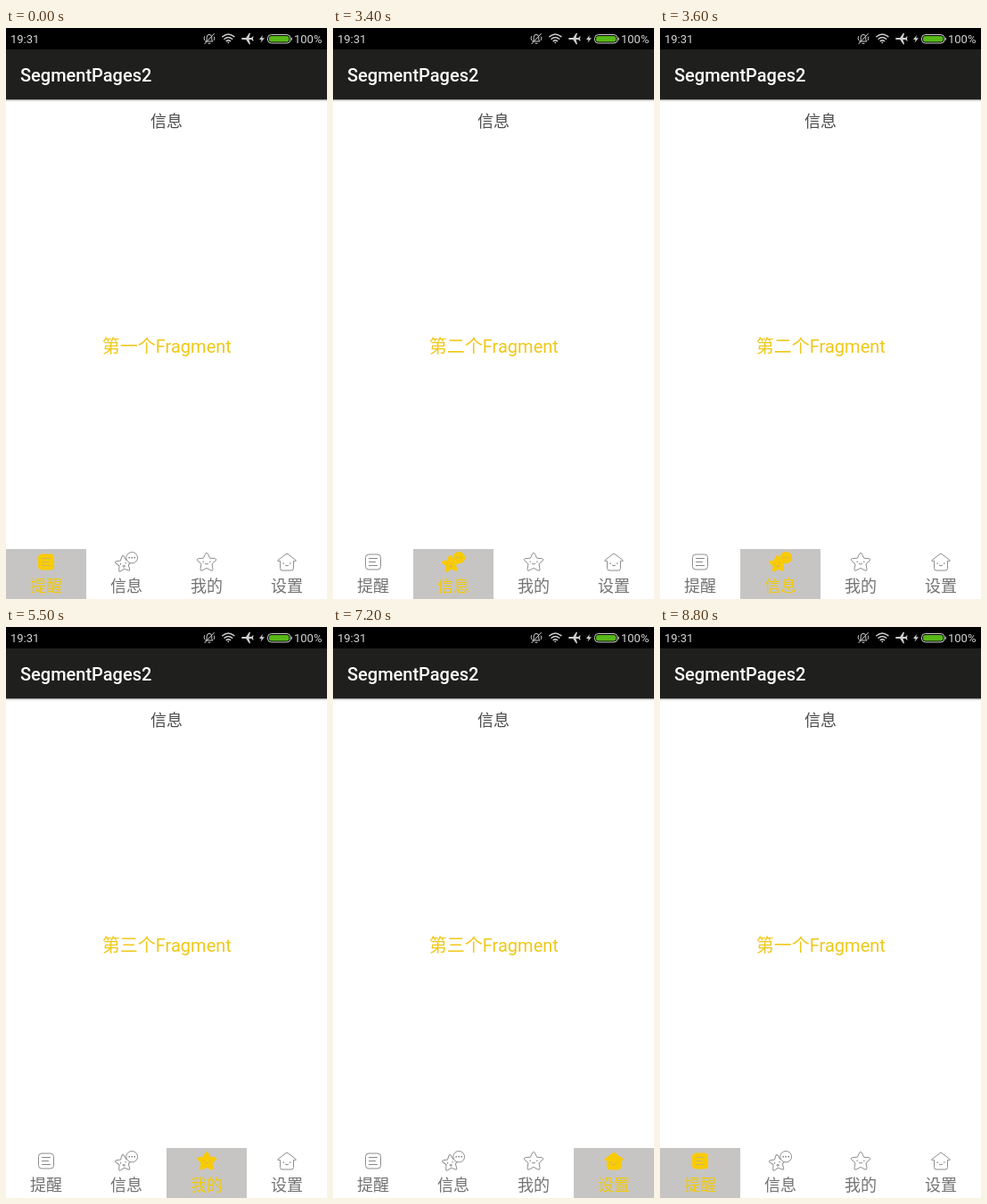
Write an HTML page that moves like this. It is 360 by 640 pixels and loops after 8.9 s.

```html
<!DOCTYPE html>
<html lang="zh-CN">
<head>
<meta charset="utf-8">
<title>Tabs</title>
<style>
html, body { margin: 0; width: 100%; height: 100%; overflow: hidden; background: #fff; }
svg { display: block; width: 360px; height: 640px; }
text { font-family: Roboto, "Noto Sans CJK SC", "Noto Sans CJK", sans-serif; }

.status { fill: #d6d6d6; font-size: 13px; }
.title { fill: #fff; font-size: 20px; font-weight: 500; }
.head { fill: #4c4c4c; font-size: 18px; font-weight: 300; text-anchor: middle; }
.body { fill: #efc81a; font-size: 20px; font-weight: 300; }
.latin { font-weight: 400; }
.label { fill: var(--label); font-size: 18px; font-weight: 300; text-anchor: middle; }
.glyph { fill: none; stroke: #d0d0d0; stroke-width: 1.2; stroke-linecap: round; }

.off { --ink: #8e8e8e; --fill: #fff; --face: #868686; --label: #737373; }
.on { --ink: #f9cb00; --fill: #f9cb00; --face: #cdb568; --label: #f0c90c; }
.shape { fill: var(--fill); stroke: var(--ink); stroke-linejoin: round; vector-effect: non-scaling-stroke; }
.line { fill: none; stroke: var(--face); stroke-linecap: round; }
.dot { fill: var(--face); }

.t1, .t2, .t3, .t4, .n3, .n4 { opacity: 0; animation: 8900ms step-end infinite; }
.t1 { animation-name: first; }
.t2 { animation-name: second; }
.t3 { animation-name: third; }
.t4 { animation-name: fourth; }
.n3 { animation-name: thirdText; }
.n4 { animation-name: fourthText; }
@keyframes first { 0% { opacity: 1 } 38.202% { opacity: 0 } 96.629%, 100% { opacity: 1 } }
@keyframes second { 0% { opacity: 0 } 38.202% { opacity: 1 } 59.551%, 100% { opacity: 0 } }
@keyframes third { 0% { opacity: 0 } 59.551% { opacity: 1 } 80.899%, 100% { opacity: 0 } }
@keyframes fourth { 0% { opacity: 0 } 80.899% { opacity: 1 } 96.629%, 100% { opacity: 0 } }
/* the page text follows the last tab slightly late */
@keyframes thirdText { 0% { opacity: 0 } 59.551% { opacity: 1 } 82.022%, 100% { opacity: 0 } }
@keyframes fourthText { 0% { opacity: 0 } 82.022% { opacity: 1 } 96.629%, 100% { opacity: 0 } }
</style>
</head>
<body>
<svg viewBox="0 0 360 640">
  <defs>
    <linearGradient id="shade" x2="0" y2="1">
      <stop offset="0" stop-color="#000" stop-opacity=".5"/>
      <stop offset=".45" stop-color="#000" stop-opacity=".12"/>
      <stop offset="1" stop-color="#000" stop-opacity="0"/>
    </linearGradient>
    <path id="star" class="shape" d="M-3.6 -4.6L-1.4 -9.5Q0 -11.6 1.4 -9.5L3.6 -4.6L9.4 -4.1Q11.8 -3.4 10.1 -1.8L6 2L7 7.6Q7.1 10.2 5 9.2L0 6.6L-5 9.2Q-7.1 10.2 -7 7.6L-6 2L-10.1 -1.8Q-11.8 -3.4 -9.4 -4.1Z"/>
    <g id="face">
      <circle class="dot" cx="-3.8" r=".8"/>
      <circle class="dot" cx="3.8" r=".8"/>
      <path class="line" d="M-1.6 2.2Q0 3.4 1.6 2.2"/>
    </g>

    <g id="tab1">
      <rect class="shape" x="-8.5" y="-8.5" width="17" height="17" rx="3.5"/>
      <path class="line" d="M-4.5 -4H4.5M-4.5 0H2.5M-4.5 4H4.5"/>
      <text class="label" y="33.8">提醒</text>
    </g>
    <g id="tab2">
      <g transform="translate(-3 2) rotate(-6) scale(.86)">
        <use href="#star"/>
        <circle class="dot" cx="-4" r=".9"/>
        <circle class="dot" cx="2.6" cy="-.6" r=".9"/>
        <circle class="line" cx="-.2" cy="3.2" r="1.2"/>
      </g>
      <ellipse class="shape" cx="6.2" cy="-4.8" rx="6.4" ry="6.2"/>
      <circle class="dot" cx="3.2" cy="-4.8" r=".9"/>
      <circle class="dot" cx="6.2" cy="-4.8" r=".9"/>
      <circle class="dot" cx="9.2" cy="-4.8" r=".9"/>
      <text class="label" y="33.8">信息</text>
    </g>
    <g id="tab3">
      <use href="#star" y=".3"/>
      <use href="#face" y="-.2"/>
      <text class="label" y="33.8">我的</text>
    </g>
    <g id="tab4">
      <path class="shape" d="M-7.5 -1H-9.6Q-11 -1 -10 -2L-1 -8.9Q0 -9.7 1 -8.9L10 -2Q11 -1 9.6 -1H7.5V7Q7.5 9.5 5 9.5H-5Q-7.5 9.5 -7.5 7Z"/>
      <use href="#face" y="1.6"/>
      <text class="label" y="33.8">设置</text>
    </g>
    <rect id="cell" x="-45" y="-14.5" width="90" height="56.5" fill="#c7c5c4"/>
  </defs>

  <rect width="360" height="640" fill="#fff"/>
  <rect y="24" width="360" height="56" fill="#1f1f1d"/>
  <rect y="80" width="360" height="3" fill="url(#shade)"/>
  <rect width="360" height="24" fill="#000"/>

  <text class="status" x="5" y="17.2">19:31</text>
  <text class="status" x="323" y="17.2">100%</text>
  <g class="glyph">
    <path d="M224 15H232L230.8 13.3V10.5Q230.5 7.4 228 7.2Q225.3 7.4 225.2 10.5V13.3ZM227 17.3H229M222.8 17.8L233.4 6.4M222.6 9.5Q221.5 11.5 222.6 13.5M233.4 10Q234.5 11.8 233.4 13.5" stroke-width="1"/>
    <path d="M242.8 9.8Q249.3 4.2 255.9 9.8M245 12.3Q249.3 8.6 253.7 12.3M247.2 14.6Q249.3 12.9 251.5 14.6" stroke-width="1.5"/>
    <circle cx="249.3" cy="16.3" r=".9" fill="#d0d0d0" stroke="none"/>
  </g>
  <path fill="#d0d0d0" d="M264 12Q264 11 265.5 11H269.2L272.7 5.8H274.1L272.5 11H275.3L276.7 9.4H277.7L276.9 12L277.7 14.6H276.7L275.3 13H272.5L274.1 18.2H272.7L269.2 13H265.5Q264 13 264 12Z"/>
  <path fill="#d0d0d0" d="M287.8 8L284 12.9H286.6L285.6 16.6L290 11.3H287.2Z"/>
  <rect x="293.5" y="7.5" width="25.5" height="9.5" rx="4" fill="#000" stroke="#d0d0d0"/>
  <rect x="295" y="9" width="22.5" height="6.5" rx="2.8" fill="#57b817"/>
  <path d="M320.2 10.8V13.7" stroke="#d0d0d0" stroke-width="1.2"/>

  <text class="title" x="16" y="60.4">SegmentPages2</text>
  <text class="head" x="180" y="111.2">信息</text>

  <g class="body">
    <text x="107.8" y="363.8">第</text>
    <text class="t1" x="127.8" y="363.8">一</text>
    <text class="t2" x="127.8" y="363.8">二</text>
    <text class="n3" x="127.8" y="363.8">三</text>
    <text class="n4" x="127.8" y="363.8">四</text>
    <text x="147.8" y="363.8">个<tspan class="latin">Fragment</tspan></text>
  </g>

  <g class="off">
    <use href="#tab1" x="45" y="598.5"/>
    <use href="#tab2" x="135" y="598.5"/>
    <use href="#tab3" x="225" y="598.5"/>
    <use href="#tab4" x="315" y="598.5"/>
  </g>
  <g class="on">
    <g class="t1"><use href="#cell" x="45" y="598.5"/><use href="#tab1" x="45" y="598.5"/></g>
    <g class="t2"><use href="#cell" x="135" y="598.5"/><use href="#tab2" x="135" y="598.5"/></g>
    <g class="t3"><use href="#cell" x="225" y="598.5"/><use href="#tab3" x="225" y="598.5"/></g>
    <g class="t4"><use href="#cell" x="315" y="598.5"/><use href="#tab4" x="315" y="598.5"/></g>
  </g>
</svg>
</body>
</html>
```
